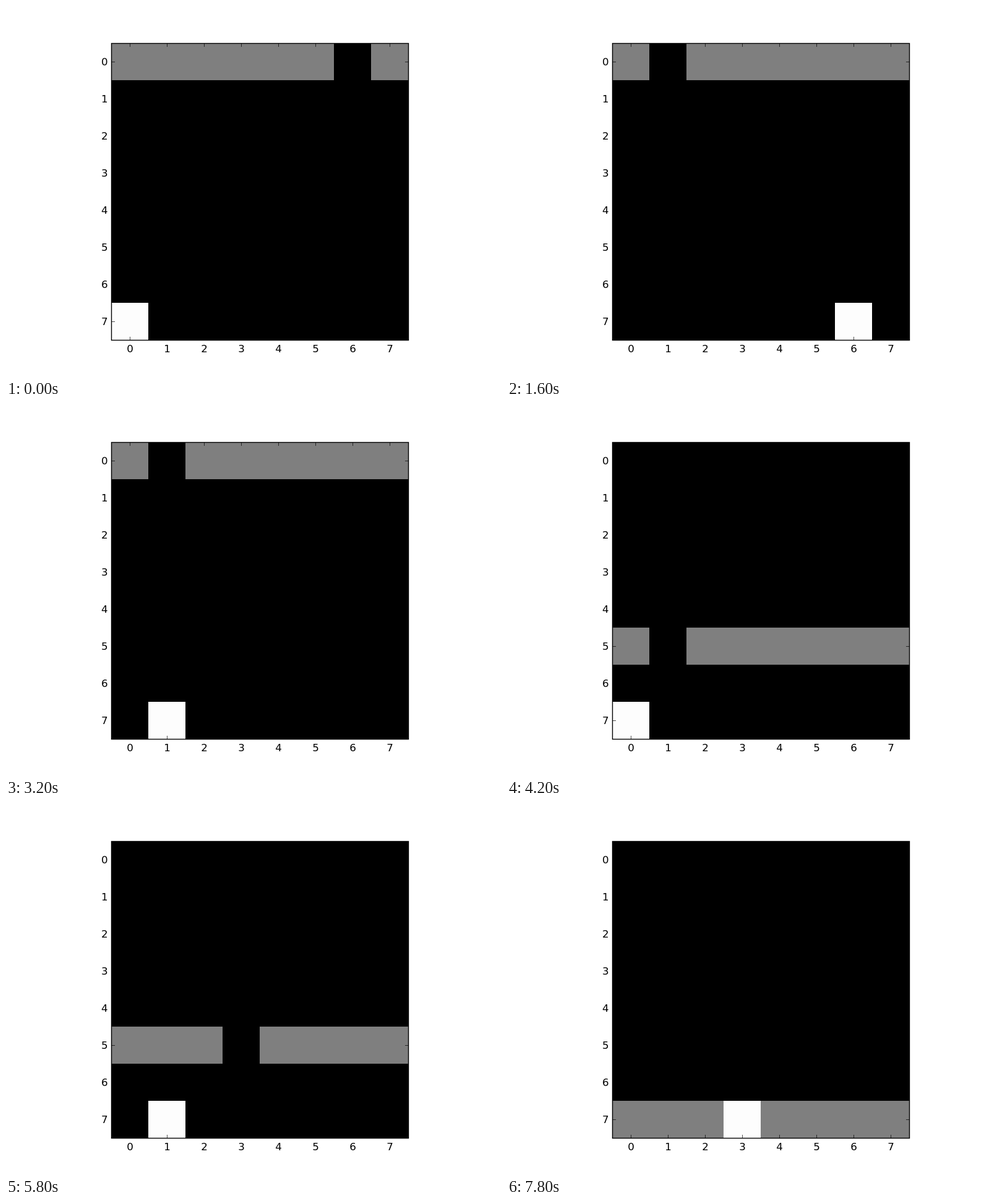
Write an HTML page with a canvas that moves like this. It is 800x600 px and loops after 8 s.

```html
<!DOCTYPE html>
<html lang="en">
<head>
<meta charset="utf-8">
<title>Wall and runner</title>
<style>
  html, body { margin: 0; width: 100%; height: 100%; overflow: hidden; background: #fff; }
  canvas { display: block; }
</style>
</head>
<body>
<canvas id="stage" width="800" height="600"></canvas>
<script>
const ctx = document.getElementById('stage').getContext('2d');
const LEFT = 170, TOP = 60, CELL = 60, CELLS = 8, SIZE = CELL * CELLS;
const STEP_MS = 200, TICK = 5.56;

// Each pass: the column of the hole in the falling wall, and the runner's column per step.
const passes = [
  { hole: 6, path: '01234566' },
  { hole: 1, path: '65432111' },
  { hole: 1, path: '11100011' },
  { hole: 3, path: '11111123' },
  { hole: 3, path: '33333333' },
];

function fillCell(column, row, color) {
  ctx.fillStyle = color;
  ctx.fillRect(LEFT + column * CELL, TOP + row * CELL, CELL, CELL);
}

function line(x, y, dx, dy) {
  ctx.beginPath();
  ctx.moveTo(x, y);
  ctx.lineTo(x + dx, y + dy);
  ctx.stroke();
}

function drawAxes() {
  const x0 = LEFT + 0.5, y0 = TOP + 0.5, x1 = x0 + SIZE, y1 = y0 + SIZE;
  ctx.strokeStyle = ctx.fillStyle = '#000';
  ctx.lineWidth = 1.39;
  ctx.strokeRect(x0, y0, SIZE, SIZE);

  ctx.lineWidth = 0.69;
  ctx.font = '16.67px "DejaVu Sans", sans-serif';
  for (let i = 0; i < CELLS; i++) {
    const offset = (i + 0.5) * CELL;
    const x = x0 + offset, y = y0 + offset;
    line(x, y0, 0, TICK);
    line(x, y1, 0, -TICK);
    line(x0, y, TICK, 0);
    line(x1, y, -TICK, 0);
    ctx.textAlign = 'center';
    ctx.fillText(i, x, 560);
    ctx.textAlign = 'right';
    ctx.fillText(i, 164.5, TOP + offset + 6);
  }
}

function draw(time) {
  const step = Math.floor(time / STEP_MS) % (passes.length * CELLS);
  const row = step % CELLS;
  const { hole, path } = passes[Math.floor(step / CELLS)];

  ctx.fillStyle = '#fff';
  ctx.fillRect(0, 0, 800, 600);
  ctx.fillStyle = '#000';
  ctx.fillRect(LEFT, TOP, SIZE, SIZE);
  for (let column = 0; column < CELLS; column++) {
    if (column !== hole) fillCell(column, row, '#7f7f7f');
  }
  fillCell(Number(path[row]), CELLS - 1, '#fdfdfd');
  drawAxes();
}

function tick() {
  draw(performance.now());
  requestAnimationFrame(tick);
}
tick();
</script>
</body>
</html>
```
